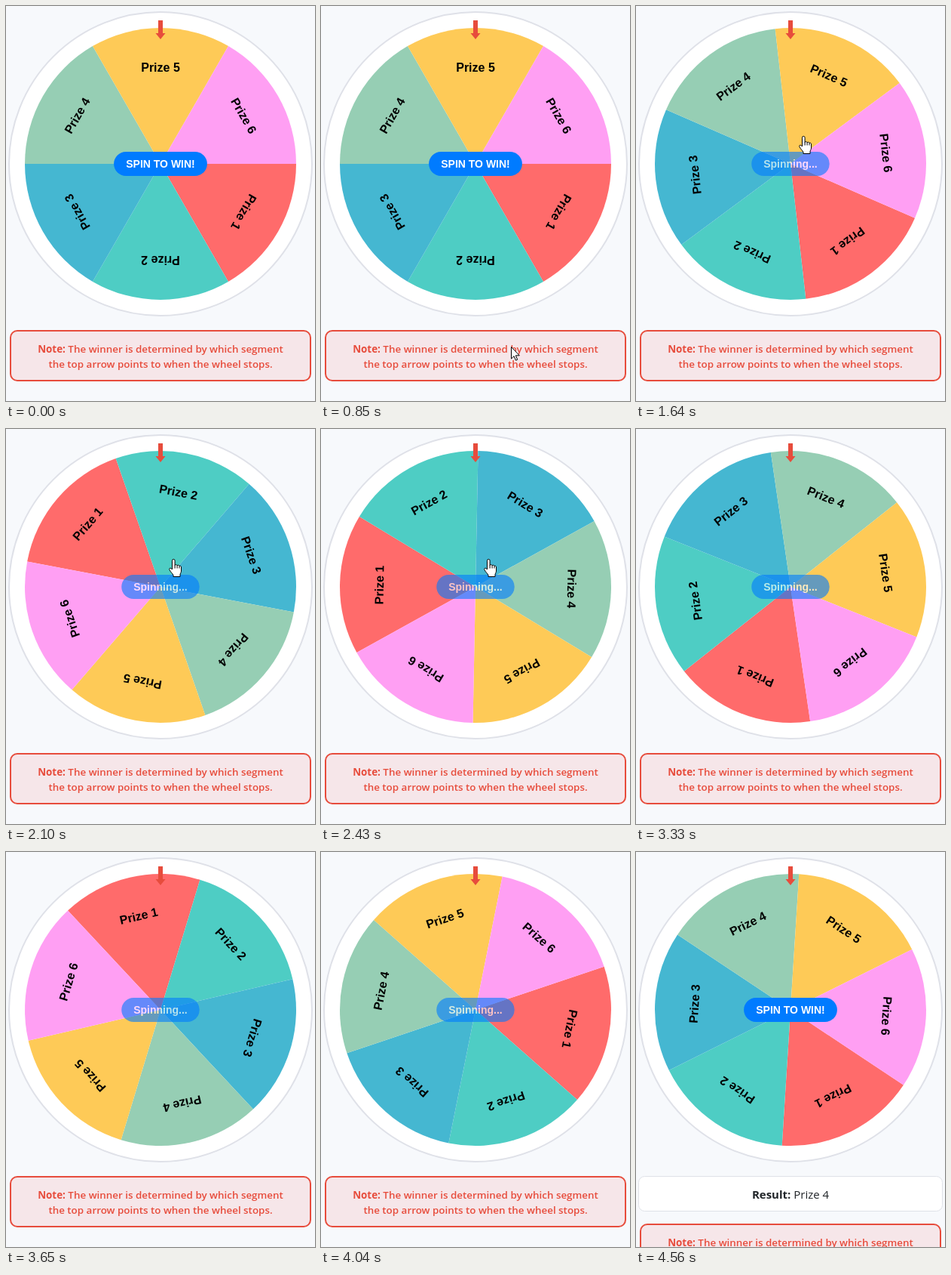
An HTML page that plays this animation: 410x523 px, repeating every 7360 ms.

```html
<!DOCTYPE html>
<html lang="en">
<head>
<meta charset="utf-8">
<title>Prize wheel</title>
<style>
  html, body { margin: 0; width: 100%; height: 100%; overflow: hidden; background: #f7f9fc; }
  svg { display: block; width: 100vw; height: 100vh; }
  text { text-anchor: middle; }
  .label, .button { font-family: "Liberation Sans", Arial, sans-serif; font-weight: 700; }
  .label { font-size: 16px; }
  .button { font-size: 14px; fill: #fff; }
  .copy { font-family: "Open Sans", "Noto Sans", sans-serif; }
  .note { font-size: 13.4px; font-weight: 600; fill: #e74c3c; }
  .result { font-size: 15px; fill: #212529; }
  .bold { font-weight: 700; }
</style>
</head>
<body>
<svg viewBox="0 0 410 523">
  <circle cx="205" cy="209" r="201" fill="#fff" stroke="#dfe1e8" stroke-width="2"/>
  <g id="wheel"></g>
  <path d="M202 19h6v17h3.5L205 44l-6.500-8H202z" fill="#e74c3c"/>
  <g id="button">
    <rect id="pill" y="193" height="32" rx="16" fill="#007bff"/>
    <text id="caption" class="button" x="205" y="214"></text>
  </g>
  <g id="result">
    <rect x="3.500" y="429.500" width="403" height="46" rx="8" fill="#fff" stroke="#dfe2e8"/>
    <text class="copy result" x="205" y="459"><tspan class="bold">Result:</tspan> Prize 4</text>
  </g>
  <g id="note">
    <rect x="6" y="430" width="398" height="66" rx="9" fill="#f6e6e9" stroke="#e74c3c" stroke-width="2"/>
    <text class="copy note" x="205" y="459"><tspan class="bold">Note:</tspan> The winner is determined by which segment</text>
    <text class="copy note" x="205" y="479">the top arrow points to when the wheel stops.</text>
  </g>
  <g id="cursor" stroke="#000" stroke-linejoin="round">
    <path id="arrow" fill="#fff" d="M.5.5V16l3.600-3.400 2.400 5.600 2.200-1-2.400-5.400h5z"/>
    <g id="hand" transform="translate(-7 0)">
      <path fill="#fff" d="M5.500 2.300a1.800 1.800 0 0 1 3.600 0V8.300a1.700 1.700 0 0 1 3 .5 1.700 1.700 0 0 1 2.900.8 1.500 1.500 0 0 1 2.500 1.300V16c0 2-1.500 3.500-1.500 5v2.500H7v-2c-1-2-3.500-4-5-7-1-2 1-3 2.200-1.800L5.500 14z"/>
      <path fill="none" d="M9.100 8v4.500M12.100 9v3.500M15 9.800v2.700"/>
    </g>
  </g>
  <circle id="click" cx="221" cy="172" r="12" fill="#ff0" fill-opacity=".47"/>
</svg>
<script>
const LOOP = 7360, SPIN = 1640, DONE = 4560, LAST_TICK = 45;
const FINAL_ANGLE = 5 * 360 + 33.6;
const COLORS = ["#ff6b6b", "#4ecdc4", "#45b7d1", "#96ceb4", "#feca57", "#ff9ff3"];
const REST = [222, 172], ENTRY = [253, 464], EXIT = [386, 418];

const $ = id => document.getElementById(id);
const show = (id, on) => $(id).setAttribute("display", on ? "inline" : "none");
const smooth = p => p * p * (3 - 2 * p);
const mix = (a, b, p) => a.map((v, i) => v + (b[i] - v) * p);

const edge = (180 * Math.sqrt(3) / 2).toFixed(2);
$("wheel").innerHTML = COLORS.map((color, i) => `
  <g transform="rotate(${i * 60 + 120})">
    <path d="M0 0L-90-${edge}A180 180 0 0 1 90-${edge}z" fill="${color}"/>
    <text class="label" y="-122">Prize ${i + 1}</text>
  </g>`).join("");

// The picture advances in ticks of roughly 65 ms while the wheel turns.
const tickTime = n => SPIN + 65.9 * n - 0.0255 * n * n;
function tickAt(t) {
  let n = 0;
  while (n < LAST_TICK && tickTime(n + 1) <= t + 10) n++;
  return n;
}

// Constant deceleration: the angle left to turn is a square.
function wheelAngle(t) {
  if (t < SPIN) return 0;
  if (t >= DONE) return FINAL_ANGLE;
  const n = tickAt(t);
  const left = Math.max(0, 42.545 - 0.9627 * n + 0.000218 * n * n);
  return FINAL_ANGLE - left * left;
}

function cursorAt(t) {
  if (t < 730) return null;
  if (t < SPIN) {
    const step = Math.min(8, Math.floor((t - 730 + 1) / 71.25));
    return mix(ENTRY, REST, smooth(step / 8));
  }
  const n = tickAt(t);
  if (n > 22) return null;
  return n < 18 ? REST : mix(REST, EXIT, smooth((n - 17) / 5));
}

function drawButton(spinning) {
  const width = spinning ? 103.5 : 123.8;
  $("pill").setAttribute("x", 205 - width / 2);
  $("pill").setAttribute("width", width);
  $("caption").textContent = spinning ? "Spinning..." : "SPIN TO WIN!";
  $("button").setAttribute("opacity", spinning ? 0.6 : 1);
}

function drawCursor(t) {
  const pos = cursorAt(t);
  show("cursor", pos);
  if (!pos) return;
  const [x, y] = pos.map(Math.round);
  const overButton = y < 225 && Math.abs(x - 205) < 62;
  $("cursor").setAttribute("transform", `translate(${x} ${y})`);
  show("hand", overButton);
  show("arrow", !overButton);
}

function draw(t) {
  const done = t >= DONE;
  $("wheel").setAttribute("transform", `translate(205 209) rotate(${wheelAngle(t)})`);
  drawButton(t >= SPIN && !done);
  drawCursor(t);
  show("click", t >= 1500 && t < SPIN);
  show("result", done);
  $("note").setAttribute("transform", `translate(0 ${done ? 63 : 0})`);
}

const start = performance.now();
function frame() {
  draw((performance.now() - start) % LOOP);
  requestAnimationFrame(frame);
}
frame();
</script>
</body>
</html>
```
